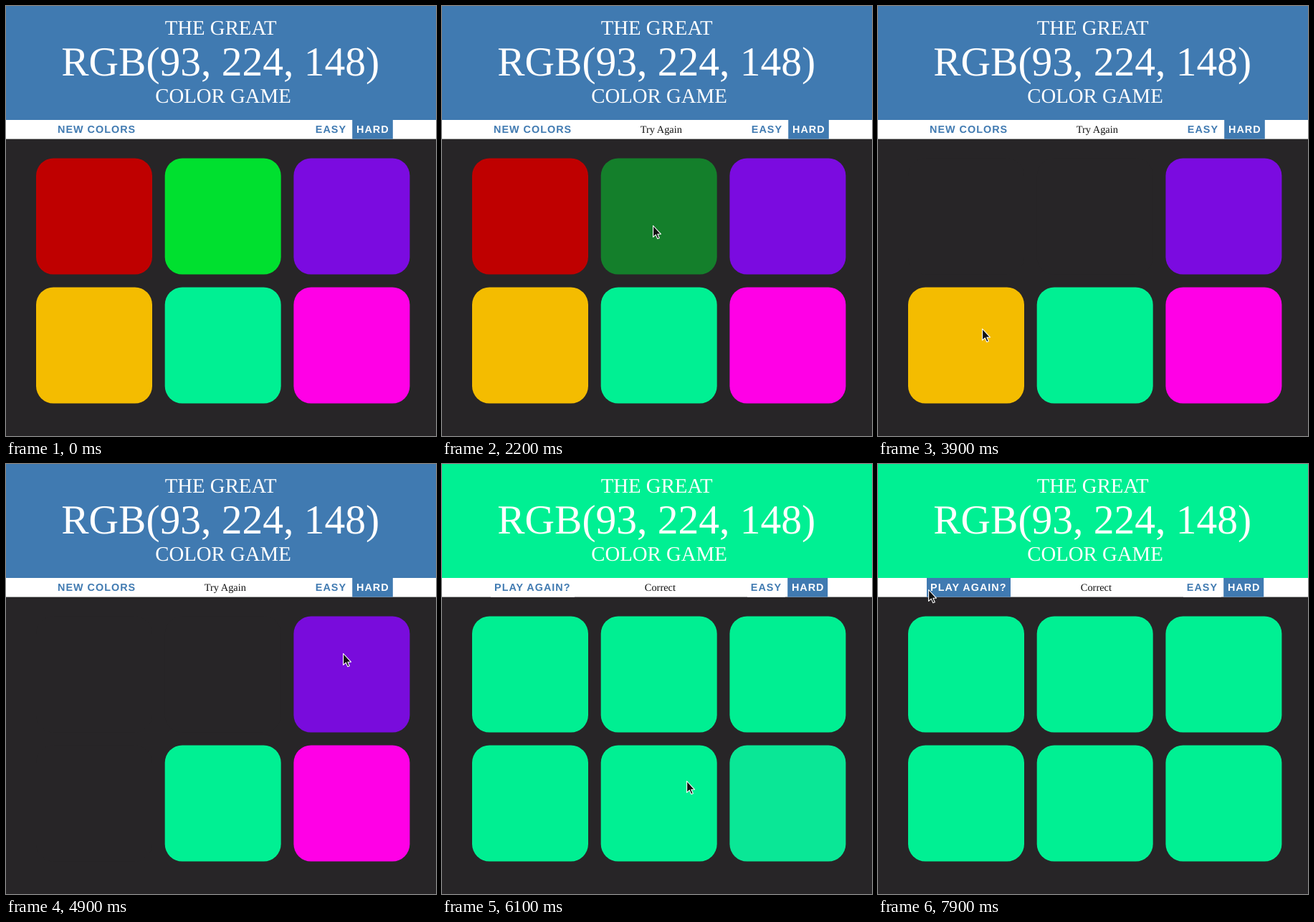
An HTML page for the animation above (8000 ms loop, 600x600 px).

```html
<!DOCTYPE html>
<html lang="en">
<head>
<meta charset="utf-8">
<title>RGB color game</title>
<style>
  html, body { margin: 0; width: 100%; height: 100%; overflow: hidden; background: #272527; }
  svg { display: block; width: 100%; height: 100%; }
  text { text-rendering: geometricPrecision; }
  .serif { font-family: "Liberation Serif", "Times New Roman", serif; }
  .title { fill: #fff; font-size: 28.8px; }
  .title .code { font-size: 57.5px; }
  .message { fill: #111; font-size: 14.4px; }
  .button { fill: #407ab1; font: bold 14.4px "Liberation Sans", Arial, sans-serif; letter-spacing: 1px; }
  .selected { fill: #fff; }
</style>
</head>
<body>
<svg viewBox="0 0 600 600">
  <rect width="600" height="600" fill="#272527"/>
  <rect id="header" width="600" height="159" fill="#407ab1"/>
  <g class="serif title">
    <text x="221.7" y="40.3">THE GREAT</text>
    <text class="code" x="77.2" y="97.3">RGB(93, 224, 148)</text>
    <text x="208.2" y="134.6">COLOR GAME</text>
  </g>
  <rect y="159" width="600" height="26.6" fill="#fff"/>
  <g id="playing">
    <rect x="483.2" y="159" width="56.6" height="26.6" fill="#407ab1"/>
    <text class="button" x="72" y="176.7">NEW COLORS</text>
    <text class="button" x="431.8" y="176.7">EASY</text>
    <text class="button selected" x="489" y="176.7">HARD</text>
    <text id="retry" class="serif message" x="276.7" y="176.8">Try Again</text>
  </g>
  <g id="won">
    <rect id="againBox" x="68" y="159" width="117" height="26.6" fill="#fff"/>
    <rect id="easyBox" x="426" y="159" width="53" height="26.6" fill="#fff"/>
    <rect x="482.2" y="159" width="56" height="26.6" fill="#407ab1"/>
    <text id="againText" class="button" x="73.1" y="176.7">PLAY AGAIN?</text>
    <text id="easyText" class="button" x="430.8" y="176.7">EASY</text>
    <text class="button selected" x="487.9" y="176.7">HARD</text>
    <text class="serif message" x="282.8" y="176.8">Correct</text>
  </g>
  <g id="squares"></g>
  <path id="cursor" d="M.6 .5V16.4L4.3 13.1L6.8 18.8L9.3 17.7L6.9 12.2H11.4Z"
        fill="#111" stroke="#fff" stroke-width="1.1" stroke-linejoin="round"/>
</svg>
<script>
const LOOP = 8000, FADE = 600, WIN = 5620;
const BLUE = '#407ab1', DARK = '#272527', MINT = '#00f093', WHITE = '#fff';
const $ = id => document.getElementById(id);

// steps: [time, value, easing towards the next step]
function play(el, prop, steps) {
  const all = [[0, steps[0][1]], ...steps, [LOOP, steps.at(-1)[1]]];
  el.animate(all.map(([time, value, easing = 'linear']) =>
    ({ offset: time / LOOP, [prop]: value, easing })),
    { duration: LOOP, iterations: Infinity });
}

const fade = (time, from, to, length = FADE, easing = 'ease') =>
  [[time, from, easing], [time + length, to]];

function toggle(el, time, from, to) {
  play(el, 'opacity', [[time, from], [time, to]]);
}

// colour and moment of the wrong guess, if there is one
const squares = [
  ['#bf0000', 3150], ['#00e02f', 2020], ['#7b0be0', 4880],
  ['#f4bc00', 3950], [MINT], ['#ff00e6']
];
squares.forEach(([color, guess], i) => {
  const box = document.createElementNS('http://www.w3.org/2000/svg', 'rect');
  const attrs = {
    x: 42 + i % 3 * 179.7, y: 212.5 + Math.floor(i / 3) * 180,
    width: 162, height: 162, rx: 24.3, fill: color
  };
  for (const name in attrs) box.setAttribute(name, attrs[name]);
  $('squares').append(box);
  if (color === MINT) return;
  play(box, 'fill', guess
    ? [...fade(guess, color, DARK), ...fade(WIN, DARK, MINT, 530)]
    : fade(WIN, color, MINT, 500, 'linear'));
});

play($('header'), 'fill', fade(WIN, BLUE, MINT, 370));
toggle($('retry'), 2020, 0, 1);
toggle($('playing'), WIN, 1, 0);
toggle($('won'), WIN, 0, 1);

const hover = (rest, lit) => [...fade(6970, rest, lit, 500), ...fade(7470, lit, rest, 300)];
play($('easyBox'), 'fill', hover(WHITE, '#8fb2d3'));
play($('easyText'), 'fill', hover(BLUE, '#a8cbe6'));
play($('againBox'), 'fill', fade(7480, WHITE, BLUE, 400));
play($('againText'), 'fill', fade(7480, BLUE, WHITE, 400));

const path = [
  [1380, 400, 600], [1900, 294, 306], [2450, 294, 306], [3050, 169, 307],
  [3300, 169, 307], [3800, 145, 450], [4100, 145, 450], [4800, 470, 264],
  [5050, 470, 264], [5550, 341, 442], [6250, 341, 442], [7080, 444, 177.5],
  [7180, 444, 177.5], [7850, 70, 175]
];
play($('cursor'), 'transform', path.map(([time, x, y]) =>
  [time, `translate(${x}px, ${y}px)`, 'ease-in-out']));
toggle($('cursor'), 1400, 0, 1);
</script>
</body>
</html>
```
